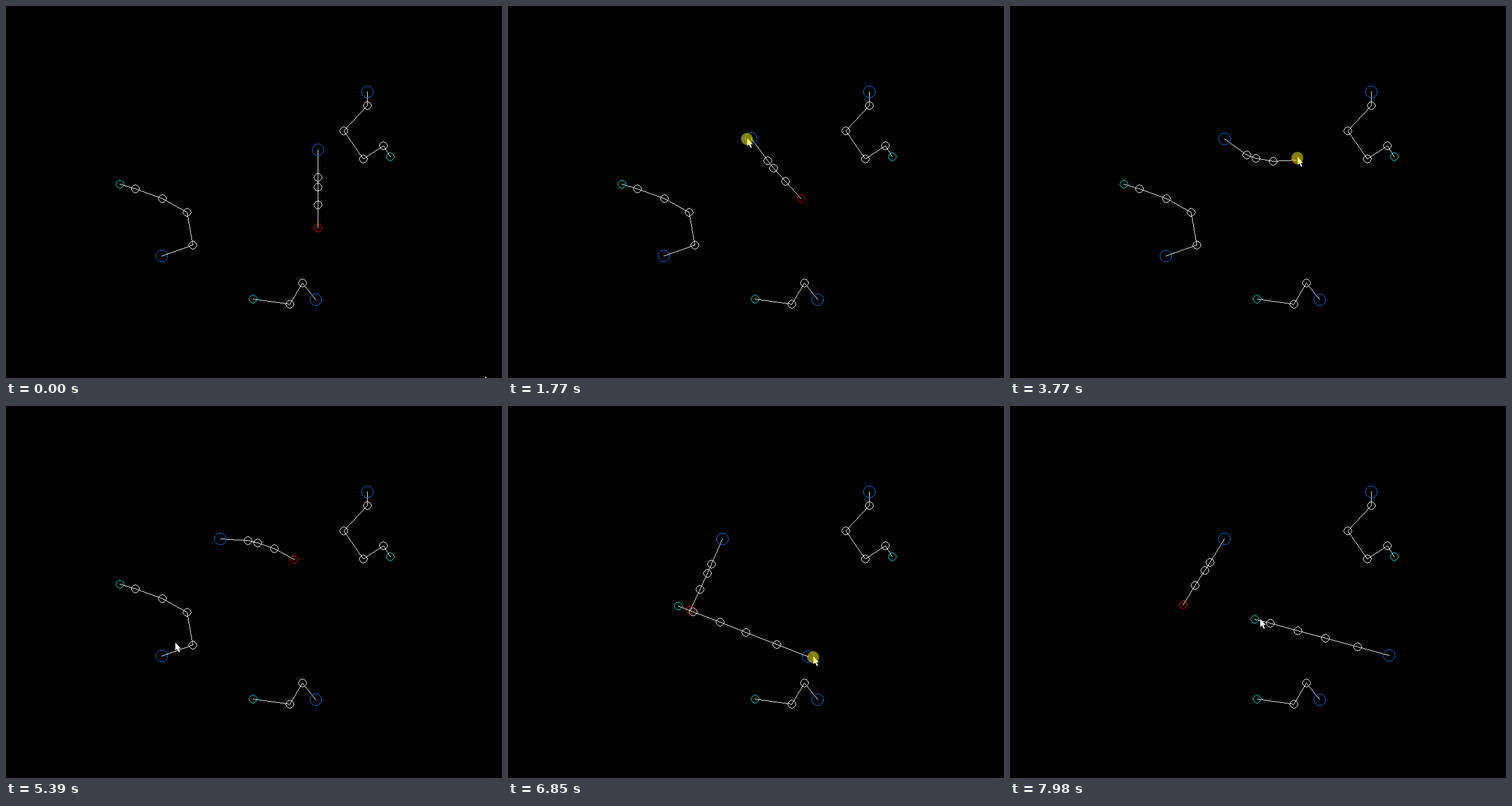
A matplotlib script that plays this animation: 864x648 px, repeating every 8000 ms.

```python
import numpy as np
import matplotlib.pyplot as plt
from matplotlib.animation import FuncAnimation
from matplotlib.patches import Circle, Polygon

W, H, DPI = 864, 648, 100
STEP, COUNT = 20, 400
BLUE, CYAN, RED, WHITE = "#0a70e0", "#00dcdc", "#e00000", "#ffffff"
LAG = 0.042  # seconds a dragged joint trails the pointer

# key points of the pointer: time in s, x, y
POINTER = np.array([
    (.02, 834, 646), (.74, 546, 255), (.85, 546, 254), (1.05, 525, 247),
    (1.65, 436, 231), (2.1, 373, 232), (2.5, 420, 322), (2.91, 420, 322),
    (3.15, 421, 341), (3.77, 500, 264), (4.12, 508, 235), (4.79, 508, 235),
    (5.39, 294, 413), (5.75, 271, 436), (5.95, 271, 436), (6.39, 405, 438),
    (6.85, 531, 437), (7.6, 660, 435), (7.98, 435, 372)])
ROPE_DRAG, TIP_DRAG, ARM_DRAG = (.85, 2.1), (3.15, 4.52), (5.85, 7.6)

# key poses of the rope: time in s, then swing, bend and kink in degrees
ROPE = np.array([
    (.85, 0, 0, 0), (1.05, 8, -2, -12), (1.67, 39, 5, 0), (2.1, 40, -12, 10),
    (2.57, 24, -29, 20), (2.91, 24, -29, 20), (3.15, 25, -12, 0),
    (3.77, 74, 13, 0), (4.12, 90, 0, 0), (4.79, 90, 0, 0), (5.39, 74, -8, 0),
    (6.85, -24.5, -1, 0), (7.45, -40, 0, 0), (7.98, -32, 0, 0)])
ROPE_LENGTHS = np.array([48, 17, 31, 40])
BEND = np.arange(4) - 1.5
KINK = np.array([1, -1, 1, -1])

ARM = np.array([(271, 436), (325, 417), (315, 360), (272, 336),
                (225, 319), (198, 311)], float)
STILL = [
    [(629, 150), (629, 174), (588, 218), (622, 267), (657, 244), (669, 263)],
    [(539, 512), (516, 483), (494, 520), (430, 511)],
]
ARROW = np.array([(0, 0), (0, 14), (3, 11), (6, 17), (8, 16), (5.5, 10.5),
                  (9.5, 10.5)])


def smooth(keys, t):
    """Monotone cubic interpolation of keyed rows (time, values...)."""
    times, values = keys[:, 0], keys[:, 1:]
    slope = np.diff(values, axis=0) / np.diff(times)[:, None]
    a, b = slope[:-1], slope[1:]
    same = a * b > 0
    inner = np.where(same, 2 * a * b / np.where(same, a + b, 1), 0)
    tangent = np.vstack([slope[:1], inner, slope[-1:]])
    t = min(max(t, times[0]), times[-1])
    i = min(np.searchsorted(times, t, side="right") - 1, len(times) - 2)
    h = times[i + 1] - times[i]
    u = (t - times[i]) / h
    return ((1 + 2 * u) * (1 - u) ** 2 * values[i]
            + u * (1 - u) ** 2 * h * tangent[i]
            + u * u * (3 - 2 * u) * values[i + 1]
            + u * u * (u - 1) * h * tangent[i + 1])


def seconds(n):
    return (n + .5) * STEP / 1000


def dragged(t, start, press):
    """Position of a joint carried by the pointer during one press."""
    if t < press[0]:
        return np.array(start, float)
    return smooth(POINTER, min(t - LAG, press[1]))


def rope_pose(t):
    swing, bend, kink = smooth(ROPE, t)
    angle = np.radians(swing + bend * BEND + kink * KINK)
    steps = ROPE_LENGTHS[:, None] * np.column_stack([np.sin(angle), np.cos(angle)])
    root = dragged(t, (543, 251), ROPE_DRAG)
    return np.vstack([root, root + np.cumsum(steps, axis=0)])


def reach(joints, root, target, lengths):
    """FABRIK: keep the root, bring the tip to the target."""
    p = joints.copy()
    gap = target - root
    distance = np.hypot(*gap)
    if distance >= lengths.sum():
        offsets = np.concatenate([[0], np.cumsum(lengths)])
        return root + offsets[:, None] * gap / distance

    def place(i, anchor, length):
        d = p[i] - p[anchor]
        p[i] = p[anchor] + d * length / max(np.hypot(*d), 1e-6)

    for _ in range(15):
        p[-1] = target
        for i in range(len(p) - 2, -1, -1):
            place(i, i + 1, lengths[i])
        p[0] = root
        for i in range(1, len(p)):
            place(i, i - 1, lengths[i - 1])
    return p


def arm_poses():
    lengths = np.hypot(*np.diff(ARM, axis=0).T)
    pose, poses = ARM, []
    for n in range(COUNT):
        t = seconds(n)
        if t >= ARM_DRAG[0]:
            pose = reach(pose, dragged(t, ARM[0], ARM_DRAG), ARM[-1], lengths)
        poses.append(pose)
    return poses


def line_pixels(a, b):
    count = int(np.abs(b - a).max()) + 1
    return np.rint(np.linspace(a, b, count))


def ring_pixels(radius):
    x = np.arange(int(radius / np.sqrt(2)) + 1)
    y = np.rint(np.sqrt(radius ** 2 - x ** 2))
    octants = [(sx * p, sy * q) for p, q in ((x, y), (y, x))
               for sx in (-1, 1) for sy in (-1, 1)]
    return np.hstack(octants).T


BIG_RING, SMALL_RING = ring_pixels(10), ring_pixels(6.7)

fig = plt.figure(figsize=(W / DPI, H / DPI), dpi=DPI, facecolor="black")
ax = fig.add_axes([0, 0, 1, 1])
ax.set_xlim(0, W)
ax.set_ylim(H, 0)
ax.axis("off")


def pixels(color, zorder):
    return ax.plot([], [], ",", color=color, zorder=zorder)[0]


class Chain:
    """Joined links and rings, drawn as crisp single pixels."""

    def __init__(self, joints, tip_color):
        colors = [BLUE] + [WHITE] * (len(joints) - 2) + [tip_color]
        self.links = pixels(WHITE, 1)
        self.rings = [pixels(color, 2) for color in colors]
        self.pose(joints)

    def pose(self, joints):
        joints = np.rint(joints)
        links = [line_pixels(a, b) for a, b in zip(joints, joints[1:])]
        self.links.set_data(*np.vstack(links).T)
        for i, (ring, joint) in enumerate(zip(self.rings, joints)):
            shape = SMALL_RING if i else BIG_RING
            ring.set_data(*(shape + joint).T)


for joints in STILL:
    Chain(joints, CYAN)
ARM_POSES = arm_poses()
arm = Chain(ARM, CYAN)
rope = Chain(rope_pose(0), RED)
arrow = ax.add_patch(Polygon(ARROW, fc=WHITE, ec="none", zorder=3))
press_mark = ax.add_patch(Circle((0, 0), 10.3, fc="#ffff00", ec="none",
                                 alpha=.5, zorder=4))


def update(n):
    t = seconds(n)
    pointer = smooth(POINTER, t)
    rope.pose(rope_pose(t))
    arm.pose(ARM_POSES[n])
    arrow.set_xy(ARROW + pointer + (1, -1))
    press_mark.center = tuple(pointer + .5)
    press_mark.set_visible(any(start <= t < end for start, end
                               in (ROPE_DRAG, TIP_DRAG, ARM_DRAG)))
    return []


anim = FuncAnimation(fig, update, frames=COUNT, interval=STEP, repeat=True,
                     repeat_delay=0, cache_frame_data=False)
plt.show()
```
